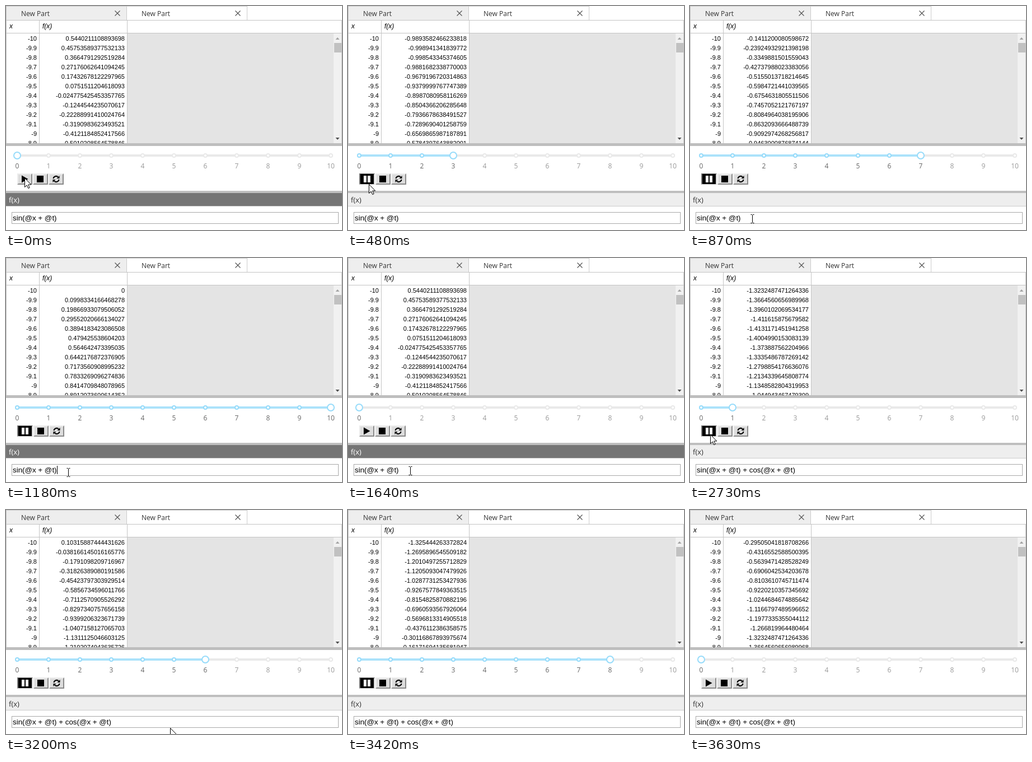
Recreate the animation shown at these times as an HTML page. Size 600x400 px, loop 3.94 s.

```html
<!DOCTYPE html>
<html lang="en">
<head>
<meta charset="utf-8">
<title>Function table</title>
<style>
  html, body { margin: 0; width: 100%; height: 100%; overflow: hidden; background: #fff; }
  svg { display: block; width: 600px; height: 400px; }
  text { white-space: pre; }
  .ui { font: 12px "Open Sans", "Noto Sans", sans-serif; fill: #333; }
  .cell { font: 11px "Liberation Sans", Arial, sans-serif; text-anchor: end; }
  .head { font: italic 12px "Liberation Sans", Arial, sans-serif; }
  .input { font: 13.333px "Liberation Sans", Arial, sans-serif; }
  .mark { text-anchor: middle; fill: #999; }
  .mark.on { fill: #666; }
  .dot { fill: #fff; stroke: #e9e9e9; stroke-width: 2; }
  .dot.on, #handle { stroke: #96dbfa; }
  #handle { fill: #fff; stroke-width: 2; }
  #panelTitle { font-size: 13px; }
  .cross { stroke: #555; stroke-width: 1.2; fill: none; }
</style>
</head>
<body>
<svg id="stage" viewBox="0 0 600 400" xmlns="http://www.w3.org/2000/svg"></svg>
<script>
const LOOP = 3940;
const ROWS = 12;
const STEP = 56;

// Moments at which the slider advances by one, per run
const runs = [
  { start: 170, end: 1260, ticks: [280, 380, 480, 580, 680, 780, 870, 970, 1080, 1180] },
  { start: 2480, end: 3630, ticks: [2650, 2750, 2850, 2940, 3040, 3130, 3260, 3350, 3450, 3540] }
];

// time, shape, x, y
const pointerKeys = [
  [0, "arrow", 33, 307], [280, "arrow", 34, 310], [380, "arrow", 36, 315],
  [480, "arrow", 37, 318], [580, "arrow", 60, 338], [630, "arrow", 92, 356],
  [680, "beam", 118, 379], [710, "beam", 113, 379], [780, "beam", 111, 380],
  [1110, "beam", 111, 383], [1260, "beam", 111, 380], [2020, "none", 0, 0],
  [2170, "arrow", 1, 345], [2250, "arrow", 30, 312], [2330, "arrow", 36, 315],
  [2850, "arrow", 48, 320], [2940, "arrow", 92, 334], [3040, "arrow", 178, 358],
  [3090, "arrow", 236, 374], [3130, "arrow", 270, 383], [3200, "arrow", 293, 389],
  [3260, "none", 0, 0]
];

const range = (n, fn) => Array.from({ length: n }, (_, i) => fn(i)).join("");
const rect = (x, y, w, h, fill, extra = "") =>
  `<rect x="${x}" y="${y}" width="${w}" height="${h}" fill="${fill}" ${extra}/>`;
const text = (x, y, cls, content, extra = "") =>
  `<text x="${x}" y="${y}" class="${cls}" ${extra}>${content}</text>`;
const cross = x => `<path class="cross" d="M${x - 4.5} 8.5l9 9m0-9l-9 9"/>`;
const xAt = i => (i - 100) / 10;

const button = icon =>
  rect(0, 0, 27, 20, "#8a8a8a") +
  `<path d="M0 20V0H27L25 2H2V18Z" fill="#ececec"/>` +
  rect(2, 2, 23, 16, "#ddd") + icon;

const tabs =
  rect(0, 0, 216, 25, "#eee") +
  rect(0, 0, 431, 1, "#ccc") + rect(0, 0, 1, 246, "#c4c4c4") +
  rect(215, 0, 1, 25, "#ccc") + rect(430, 0, 1, 25, "#ccc") +
  rect(0, 25, 600, 1, "#c4c4c4") +
  text(27, 18, "ui", "New Part") + cross(199) +
  text(242, 18, "ui", "New Part") + cross(414);

const table =
  rect(217, 49, 368, 197, "#e4e4e4") +
  rect(585, 49, 14, 197, "#f1f1f1") + rect(586, 66, 13, 17, "#c1c1c1") +
  `<path d="M588.5 60l3.5-4 3.5 4z" fill="#a3a3a3"/><path d="M588.5 235l3.5 4 3.5-4z" fill="#505050"/>` +
  rect(599, 25, 1, 221, "#c4c4c4") + rect(0, 48, 600, 1, "#c4c4c4") +
  rect(59, 25, 1, 221, "#c4c4c4") + rect(216, 25, 1, 221, "#c4c4c4") +
  text(6, 40, "head", "x") + text(65, 40, "head", "f(x)") +
  range(ROWS, i => text(55, 62 + 17 * i, "cell", xAt(i)) +
    text(212, 62 + 17 * i, "cell value", "")) +
  rect(0, 245, 600, 155, "#fff") + rect(0, 245, 600, 5, "#bebebe");

const slider =
  rect(20, 265, 560, 4, "#e9e9e9", 'rx="2"') +
  rect(20, 265, 0, 4, "#abe2fb", 'rx="2" id="track"') +
  range(11, i => `<circle class="dot" cx="${20 + STEP * i}" cy="267" r="3"/>` +
    text(20 + STEP * i, 290, "ui mark", i)) +
  `<circle id="handle" cx="20" cy="267" r="6"/>`;

const refreshArrow = `<path d="M-5-.8A5 5 0 0 1 3.4-3.7" fill="none" stroke="#000" stroke-width="2"/><path d="M6-6V-1H1Z"/>`;
const refreshIcon = `<g transform="translate(13.5 10)">${refreshArrow}<g transform="rotate(180)">${refreshArrow}</g></g>`;
const buttons =
  `<g id="play" transform="translate(20 299)">${button('<path d="M8 3.5L19.5 10 8 16.5Z"/>')}</g>` +
  `<g id="pause" transform="translate(20 299)">` +
    rect(0, 0, 28, 20, "#d4d4d4") + `<path d="M0 20V0H28L26 2H2V18Z" fill="#777"/>` +
    rect(2, 1, 24, 18, "#000") + rect(8, 4, 5, 12, "#fff") + rect(15, 4, 5, 12, "#fff") + `</g>` +
  `<g id="others"><g transform="translate(48 299)">${button(rect(7, 4, 12, 12, "#000"))}</g>` +
  `<g transform="translate(76 299)">${button(refreshIcon)}</g></g>`;

const panel =
  rect(0, 330, 600, 4, "#bebebe") +
  rect(0, 334, 600, 23, "#eee", 'id="panelBar"') + rect(0, 357, 600, 1, "#ccc") +
  text(5, 351, "ui", "f(x)", 'id="panelTitle"') +
  rect(10.5, 368.5, 583, 20, "#fff", 'stroke="#a9a9a9"') +
  text(12, 383, "input", "", 'id="formula"') +
  rect(91, 371, 1, 15, "#000", 'id="caret"');

const pointers =
  `<path id="arrow" d="M.5.5V16.5L4.2 13 6.8 18.6 9.2 17.5 6.7 12H11.8Z" fill="#fff" stroke="#000"/>` +
  `<path id="beam" d="M-3-7.5H-1L0-6.5 1-7.5H3M0-6.5V6.5M-3 7.5H-1L0 6.5 1 7.5H3" fill="none" stroke="#000"/>`;

const $ = id => document.getElementById(id);
$("stage").innerHTML = tabs + table + slider + buttons + panel + pointers;

const values = document.querySelectorAll(".value");
const dots = document.querySelectorAll(".dot");
const marks = document.querySelectorAll(".mark");
const set = (id, attrs) => {
  for (const name in attrs) $(id).setAttribute(name, attrs[name]);
};
const show = (id, on) => set(id, { visibility: on ? "visible" : "hidden" });
const within = (ms, from, to) => ms >= from && ms < to;

function drawSlider(position) {
  set("track", { width: STEP * position });
  set("handle", { cx: 20 + STEP * position });
  dots.forEach((dot, i) => dot.classList.toggle("on", position > 0 && i <= position));
  marks.forEach((mark, i) => mark.classList.toggle("on", i <= position));
}

function drawPointer(ms) {
  const [, shape, x, y] = pointerKeys.filter(key => key[0] <= ms).pop();
  for (const id of ["arrow", "beam"]) show(id, id === shape);
  const half = shape === "beam" ? 0.5 : 0;
  if (shape !== "none") set(shape, { transform: `translate(${x + half} ${y})` });
}

function draw(ms) {
  const run = runs.find(r => within(ms, r.start, r.end));
  const position = run ? run.ticks.filter(tick => tick <= ms).length : 0;
  const withCos = ms >= 1790;
  const focused = ms < 170 || within(ms, 1110, 2480);

  // The table is briefly one step behind the slider
  const t = within(ms, 480, 580) ? position - 1 : position;
  values.forEach((cell, i) => {
    const a = xAt(i) + t;
    cell.textContent = withCos ? Math.sin(a) + Math.cos(a) : Math.sin(a);
  });

  drawSlider(position);
  show("play", !run);
  show("pause", run);
  set("others", { transform: `translate(${run ? 1 : 0} 0)` });

  set("panelBar", { fill: focused ? "#757575" : "#eee" });
  $("panelTitle").style.fill = focused ? "#fff" : "#333";
  $("formula").textContent = "sin(@x + @t)" + (withCos ? " + cos(@x + @t)" : "");
  set("caret", { x: withCos ? 188 : 91 });
  show("caret", within(ms, 1110, 1640) || within(ms, 1790, 2330));
  drawPointer(ms);
}

const start = performance.now();
function frame() {
  draw((performance.now() - start) % LOOP);
  requestAnimationFrame(frame);
}
frame();
</script>
</body>
</html>
```
